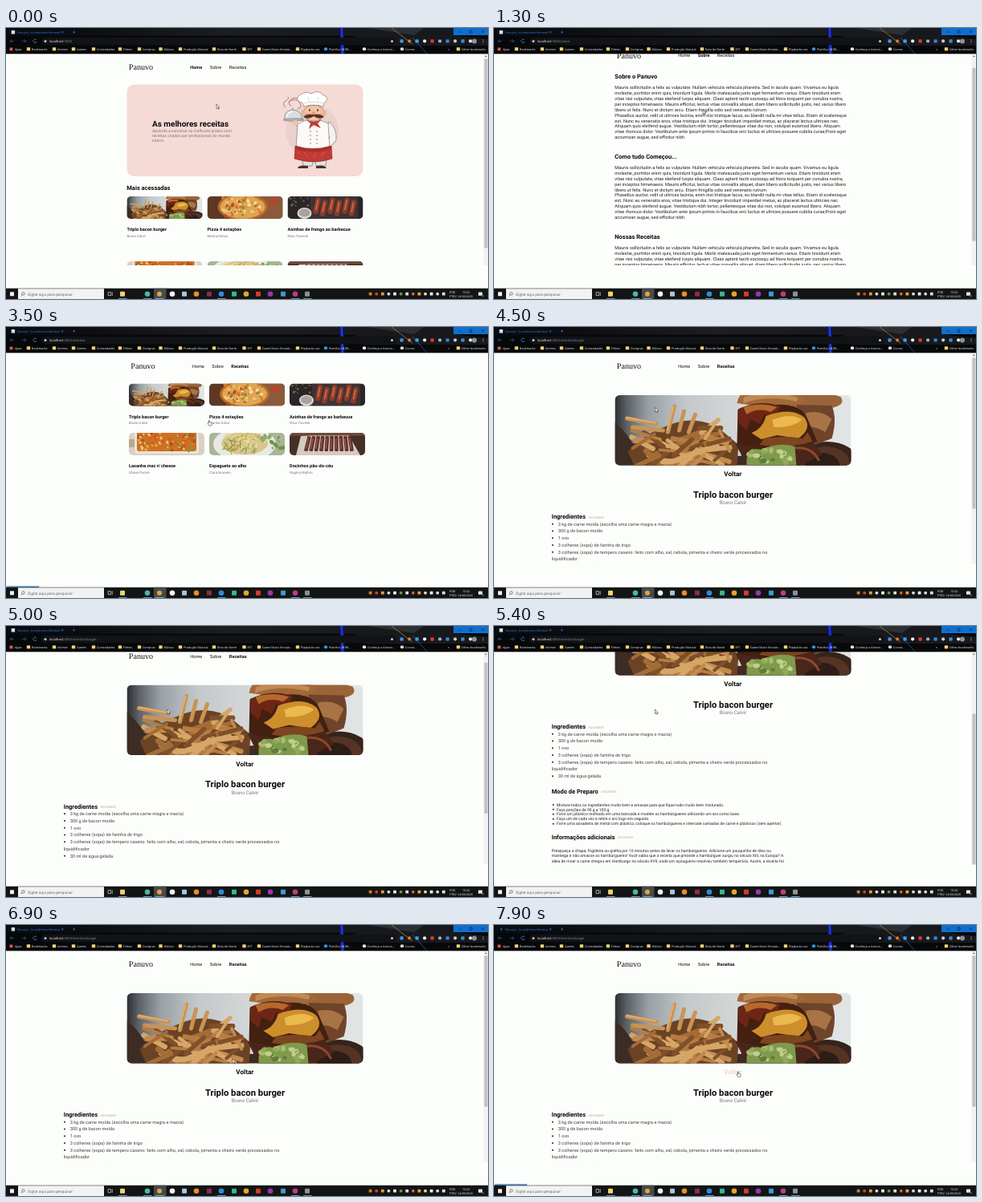
An HTML page that plays this animation: 600 px wide and 338 px high, repeating every 8 s.

```html
<!DOCTYPE html>
<html lang="pt-BR">
<head>
<meta charset="utf-8">
<title>Receitas</title>
<style>
html, body { margin: 0; width: 100%; height: 100%; overflow: hidden; background: #fcfefb; }
svg { display: block; width: 600px; height: 338px; font-family: Roboto, "Liberation Sans", sans-serif; }
text { text-rendering: geometricPrecision; white-space: pre; }
.ui { font-family: "Open Sans", "Noto Sans", sans-serif; }
.logo { font-family: "Liberation Serif", serif; }
</style>
</head>
<body>
<svg id="stage" viewBox="0 0 600 338" xmlns="http://www.w3.org/2000/svg"></svg>
<script>
const LOOP = 8000, STEP = 100;
const BRAND = 'Panuvo';
const CARDS = [
  ['Triplo bacon burger', 'Bruno Calvir'], ['Pizza 4 estações', 'Marina Dolvo'],
  ['Asinhas de frango ao barbecue', 'Elisa Trovenk'], ["Lasanha mac n' cheese", 'Otávio Parzel'],
  ['Espaguete ao alho', 'Clara Numeto'], ['Docinhos pão-do-céu', 'Rogério Baltim']
];

// Markup helpers
const text = (x, y, size, str, fill = '#111', extra = '') =>
  `<text x="${x}" y="${y}" font-size="${size}" fill="${fill}" ${extra}>${str}</text>`;
const BOLD = 'font-weight="700"', MID = 'text-anchor="middle"';
const bold = (x, y, size, str, extra = '') => text(x, y, size, str, '#0b0b0b', BOLD + ' ' + extra);
const ui = (x, y, size, str, fill = '#f4f5f6', extra = '') => text(x, y, size, str, fill, 'class="ui" ' + extra);
const rect = (x, y, w, h, fill, r = 0, extra = '') =>
  `<rect x="${x}" y="${y}" width="${w}" height="${h}" rx="${r}" fill="${fill}" ${extra}/>`;
const oval = (x, y, rx, ry, fill, extra = '') =>
  `<ellipse cx="${x}" cy="${y}" rx="${rx}" ry="${ry}" fill="${fill}" ${extra}/>`;
const path = (d, fill = 'none', stroke = 'none', w = 1, extra = '') =>
  `<path d="${d}" fill="${fill}" stroke="${stroke}" stroke-width="${w}" ${extra}/>`;
const group = (x, y, body, extra = '') => `<g transform="translate(${x} ${y})" ${extra}>${body}</g>`;
const lines = (x, y, gap, size, list, fill) => list.map((s, i) => text(x, y + i * gap, size, s, fill)).join('');
const repeat = (n, f) => Array.from({ length: n }, (_, i) => f(i)).join('');

function random(seed) {
  return () => (seed = seed * 16807 % 2147483647) / 2147483647;
}

// Scattered ovals or sticks for food textures
function scatter(seed, n, [x, y, w, h], colors, size, stick = 0, tilt = 180) {
  const r = random(seed);
  return repeat(n, () => {
    const cx = x + r() * w, cy = y + r() * h, k = size * (.6 + r() * .7);
    const fill = colors[Math.floor(r() * colors.length)], a = (r() - .5) * tilt;
    return `<g transform="translate(${cx.toFixed(1)} ${cy.toFixed(1)}) rotate(${a.toFixed(0)})">` +
      (stick ? rect(-stick / 2, -k / 2, stick, k, fill, k / 2.4) : oval(0, 0, k, k * .7, fill)) + '</g>';
  });
}

// 294 x 88 picture, also used small on its card
const FRIES = ['#c48a4e', '#a36c37', '#d6a668', '#7f5029', '#b67c42'];
const burger = rect(0, 0, 294, 88, 'url(#room)') +
  path('M0 34Q14 46 22 60L150 76L294 70V88H0Z', '#3c2c23') +
  path('M16 70Q36 48 66 38Q96 24 128 40L154 62L152 88H24Z', '#6b4324') +
  scatter(71, 34, [34, 46, 96, 40], FRIES, 6, 36, 90) +
  scatter(23, 8, [118, 38, 20, 36], FRIES, 6, 32, 150) +
  path('M15 29L52 36M22 40L60 44M66 46L74 14M80 44L86 20M92 46L100 24', 'none', '#c99355', 5, 'stroke-linecap="round"') +
  path('M15 28L50 34.5M65 44L73 14', 'none', '#e0b77c', 1.6, 'stroke-linecap="round"') +
  oval(264, 82, 38, 24, '#35241c') + oval(262, 84, 30, 20, '#553425') + oval(258, 88, 22, 16, '#2c1d17') +
  path('M214 0Q250 -8 281 2Q288 12 270 16L222 17Z', '#9a6439') +
  path('M226 12L270 13Q277 30 270 54L244 64Z', '#70442a') + path('M238 22Q258 18 270 30L262 46Q248 38 236 40Z', '#a87445') +
  path('M152 10Q156 -14 196 -12Q230 -12 236 8Q214 18 186 15Z', '#a2683a') +
  path('M160 3Q190 -8 228 3L226 8Q190 -1 160 10Z', '#c08a55') +
  path('M153 18Q176 6 200 12Q232 10 240 30L252 58Q206 74 152 62Z', '#43200f') +
  path('M154 17Q180 6 206 14L200 28L186 24L180 36L168 30L164 44L154 34Z', '#6d2615') +
  path('M160 15Q182 8 202 15L194 21Q178 15 164 24Z', '#b5692c') +
  path('M188 26Q220 14 236 28Q246 42 228 54L202 50L182 55L170 47Q184 42 188 26Z', '#cd8e2c') +
  path('M196 31Q220 21 233 31Q220 41 198 40Z', '#ecb94e') +
  path('M186 54Q212 50 234 54L240 46L246 58Q214 68 180 62Z', '#7d4520') +
  path('M150 60Q196 72 246 58L258 74L230 88H164Z', '#4a2519') +
  path('M164 80Q166 64 182 68Q204 58 224 64L226 88H164Z', '#7f9a4c') +
  scatter(33, 24, [168, 68, 54, 18], ['#a9bd70', '#5f7d36', '#90aa58', '#c2cf91'], 3.6) +
  path('M224 66Q246 64 254 82', 'none', '#8a4a2c', 3);

const photos = [
  `<g transform="scale(.32)">${burger}</g>`,
  rect(0, 0, 94, 28, '#5e3825') + rect(62, 0, 32, 28, '#8b5a3c') + oval(44, 13, 31, 17, '#b86a2b') +
    oval(44, 13, 28, 14.5, '#e0a54f') +
    scatter(5, 55, [20, 2, 48, 23], ['#c4432a', '#efc777', '#7d8a3c', '#d9782f', '#f1dca8'], 2.2) +
    oval(82, 7, 6, 4, '#b4452c'),
  rect(0, 0, 94, 28, '#2b2527') + rect(28, 0, 60, 28, '#3c3334') +
    repeat(6, i => `<g transform="rotate(12 ${36 + i * 9} 13)">${rect(33 + i * 9, 1 + i % 2 * 3, 6.5, 21, '#8e3a28', 3)}${rect(35 + i * 9, 4 + i % 2 * 3, 2, 13, '#c7694a', 1)}</g>`) +
    oval(21, 21, 9, 7, '#d9d5d0') + oval(21, 20.5, 7, 5, '#a9a3a0') + scatter(8, 14, [2, 1, 24, 12], ['#56733a', '#704038'], 1.5),
  rect(0, 0, 94, 28, '#d8d1c4') + rect(7, -2, 80, 28, '#e9e4da', 4) + rect(10, -2, 74, 25, '#cf6f22', 3) +
    scatter(17, 95, [12, 0, 70, 22], ['#e9a13b', '#d4581f', '#f3c567', '#b8441d', '#88923a'], 2) + rect(0, 8, 7, 10, '#b7a88f'),
  rect(0, 0, 94, 28, '#a8b596') + oval(44, 14, 39, 21, '#e8e9e2') + oval(44, 13, 29, 14, '#d6c68c') +
    scatter(29, 70, [20, 2, 48, 22], ['#e5cf83', '#b99a47', '#f0e2ad', '#7d9a49'], 1.2, 8) +
    scatter(41, 12, [66, 0, 28, 20], ['#6f9150', '#8dab6e'], 3),
  rect(0, 0, 94, 28, '#463026') + path('M14 4L72 0L88 28H8Z', '#d5cac0') +
    repeat(10, i => `<g transform="rotate(${14 - i * 2.5} ${22 + i * 6} 14)">${rect(20 + i * 6, 4, 4.6, 19, '#5f3128', 1)}${rect(21 + i * 6, 7, 1.4, 13, '#94594a')}</g>`) +
    rect(0, 0, 94, 3.5, '#6e4c39')
];

const chef = oval(381, 128, 33, 33, 'url(#dots)') +
  path('M348 99q-5 -5 0 -8t3 -5M355 98q-6 -6 1 -8t10 4t-3 6M352 93q4 -8 12 -5t6 -1', 'none', '#7b5d55', .7) +
  path('M361 121Q354 118 354 110L361 109L371 117L369 130Z', '#f5f3f0', '#5c4f4b', .5) +
  path('M402 117Q412 124 411 140L401 151L397 144L403 137L398 127Z', '#f4f2ef', '#5c4f4b', .5) +
  path('M368 154H400L398 172H386L384 160L381 172H370Z', '#e6e2df', '#5c4f4b', .5) +
  path('M363 175q1 -5 13 -3v3zM386 175v-3q11 -2 13 3z', '#4a302c') +
  path('M363 120Q381 108 401 119L403 151Q381 158 361 151Z', '#fbfaf8', '#5c4f4b', .5) +
  path('M360 147Q382 154 405 147L406 163Q383 171 359 163Z', '#c03b35', '#6b2723', .5) +
  path('M360 147Q382 154 405 147V151Q382 158 360 151Z', '#a92f2c') +
  path('M363 154l4 4m4 -3l5 5m10 -4l-4 5m15 -7l-5 6', 'none', '#de7169', .7) +
  path('M373 114Q383 119 393 114L388 119L392 125L383 121L377 126L379 119Z', '#c23c36') +
  oval(383, 106, 13, 10, '#f4c3a1', 'stroke="#5c4f4b" stroke-width=".5"') +
  oval(369.5, 106, 2.2, 3, '#eeb18d') + oval(396.5, 106, 2.2, 3, '#eeb18d') +
  oval(378, 102.5, .9, 1.2, '#352522') + oval(388, 102.5, .9, 1.2, '#352522') +
  oval(383, 106, 2.3, 2, '#e69c7e') + oval(374, 108, 2.2, 1.7, '#eba38a') + oval(392, 108, 2.2, 1.7, '#eba38a') +
  path('M383 108Q375 106 370 111Q376 115 383 110Q390 115 396 111Q391 106 383 108Z', '#5a3327') +
  path('M371 98Q369 91 367 93Q358 88 367 83Q373 78 380 82Q389 76 395 84Q404 86 396 94L395 98Q383 94 371 98Z', '#fff', '#5c4f4b', .5) +
  path('M371 94Q383 90 396 94M377 91l-1 -5M388 90l1 -4', 'none', '#b5aaa6', .5) +
  path('M347 114Q345 104 356 102Q367 102 369 113Z', '#d9dfe0', '#5c4f4b', .5) +
  path('M350 111Q350 106 356 104', 'none', '#fff', 1.4) + oval(357, 101, 1.4, 1.2, '#a7adb0') +
  oval(358, 114.5, 13, 1.7, '#aeb6b8', 'stroke="#5c4f4b" stroke-width=".4"') + oval(360, 118, 4, 2.8, '#f4c3a1') +
  repeat(4, i => oval(379, 129 + i * 5, .8, .8, '#86716c') + oval(387, 129 + i * 5, .8, .8, '#86716c'));

function nav(active) {
  return text(152.8, 52.4, 10.1, BRAND, '#111', 'class="logo"') +
    [['Home', 229.2], ['Sobre', 253.8], ['Receitas', 277.8]].map(([s, x], i) =>
      text(x, 51.2, 5.625, s, '#111', i === active ? BOLD : '')).join('');
}

function card(i, y) {
  const [name, author] = CARDS[i], x = 150.5 + i % 3 * 100;
  return group(x, y, `<g clip-path="url(#cardClip)">${photos[i]}</g>` +
    bold(0, 43, 5.625, name) + text(0, 50.9, 4.375, author, '#777'));
}
const row = (first, y) => repeat(3, i => card(first + i, y));

const home = nav(0) + rect(150.5, 70.5, 294, 114.5, '#f6dad5', 9) + chef +
  bold(182, 122.6, 10, 'As melhores receitas') +
  lines(182, 129.8, 5.9, 5, ['Aprenda a construir os melhores pratos com', 'receitas criadas por profissionais do mundo', 'inteiro.'], '#777') +
  bold(150.3, 201.9, 7.5, 'Mais acessadas') + row(0, 210) + row(3, 291);

const lorem = [
  'Mauris sollicitudin a felis ac vulputate. Nullam vehicula vehicula pharetra. Sed in iaculis quam. Vivamus eu ligula',
  'molestie, porttitor enim quis, tincidunt ligula. Morbi malesuada justo eget fermentum varius. Etiam tincidunt enim',
  'vitae nisi vulputate, vitae eleifend turpis aliquam. Class aptent taciti sociosqu ad litora torquent per conubia nostra,',
  'per inceptos himenaeos. Mauris efficitur, lectus vitae convallis aliquet, diam libero sollicitudin justo, nec varius libero',
  'libero ut felis. Nunc et dictum arcu. Etiam fringilla odio sed venenatis rutrum.',
  'Phasellus auctor, velit ut ultrices lacinia, enim nisi tristique lacus, eu blandit nulla mi vitae tellus. Etiam id scelerisque',
  'est. Nunc eu venenatis eros, vitae tristique dui. Integer tincidunt imperdiet metus, ac placerat lectus ultricies nec.',
  'Aliquam quis eleifend augue. Vestibulum nibh tortor, pellentesque vitae dui non, volutpat euismod libero. Aliquam',
  'vitae rhoncus dolor. Vestibulum ante ipsum primis in faucibus orci luctus et ultrices posuere cubilia curae;Proin eget',
  'accumsan augue, sed efficitur nibh.'
];
const about = nav(1) + ['Sobre o ' + BRAND, 'Como tudo Começou...', 'Nossas Receitas'].map((s, i) =>
  group(150.3, 77.6 + i * 99.8, bold(0, 0, 7.5, s) + lines(0, 13.4, 6.88, 5.625, lorem, '#222'))).join('');

const recipes = group(2.5, 0, nav(2) + row(0, 70.5) + row(3, 132));

const section = (y, s, x) => bold(71.7, y, 7.5, s) + text(x, y - .9, 3.75, 'ESCONDER', '#aaa');
const bullet = (x, y, gap, n) => repeat(n, i => oval(x, y + i * gap, 1, 1, '#222'));
const recipe = nav(2) + group(150.5, 85, `<g clip-path="url(#heroClip)">${burger}</g>`) +
  bold(297.3, 186.2, 8.1, 'Voltar', MID + ' id="back"') +
  bold(297.5, 212.5, 11.25, CARDS[0][0], MID) + text(297.5, 221.2, 6.25, CARDS[0][1], '#777', MID) +
  section(239.4, 'Ingredientes', 117.7) + bullet(73, 245.7, 8.75, 5) + bullet(73, 298.2, 1, 1) +
  lines(79.7, 247.6, 8.75, 5.625, ['3 kg de carne moída (escolha uma carne magra e macia)', '300 g de bacon moído', '1 ovo', '3 colheres (sopa) de farinha de trigo',
    '3 colheres (sopa) de tempero caseiro: feito com alho, sal, cebola, pimenta e cheiro verde processados no'], '#444') +
  text(71.7, 291.3, 5.625, 'liquidificador', '#444') + text(79.7, 300.1, 5.625, '30 ml de água gelada', '#444') +
  group(0, .8, section(318.8, 'Modo de Preparo', 133.5) + bullet(73.8, 333.1, 5.95, 5) +
  lines(78, 334.8, 5.95, 5, ['Misture todos os ingredientes muito bem e amasse para que fique tudo muito bem misturado.', 'Faça porções de 90 g a 100 g.',
    'Forre um plástico molhado em uma bancada e modele os hambúrgueres utilizando um aro como base.', 'Faça um de cada vez e retire o aro logo em seguida.',
    'Forre uma assadeira de metal com plástico, coloque os hambúrgueres e intercale camadas de carne e plásticos (sem apertar).'], '#222') +
  section(376.6, 'Informações adicionais', 154) +
  lines(71.7, 392.3, 6.3, 5, ['Preaqueça a chapa, frigideira ou grelha por 10 minutos antes de levar os hambúrgueres. Adicione um pouquinho de óleo ou',
    'manteiga e não amasse os hambúrgueres! Você sabia que a receita que precede o hambúrguer surgiu no século XIII, na Europa? A',
    'ideia de moer a carne chegou em Hamburgo no século XVII, onde um açougueiro resolveu também temperá-la. Assim, a receita foi',
    'disseminada nos Estados Unidos por alemães da região.'], '#222'));

// Browser frame and desktop bar
const marks = [['Bookmarks', 32], ['Animes', 64], ['Games', 88], ['Curiosidades', 113], ['Filmes', 146], ['Compras', 170], ['Música', 196.5],
  ['Produção Musical', 221], ['Rota do Norte', 263], ['EFT', 300.5], ['Game Music Emulat...', 319], ['Playbacks sax', 367],
  ['Planilha 2B R8...', 402, '#2e9be6'], ['Conheça o Acervo...', 450, '#e8e8e8'], ['Cursos', 497, '#d8d8d8'], ['Other bookmarks', 567]];
const extensions = ['#4a90e2', '#d8792c', '#3aa0e8', '#f0f0f0', '#d93b32', '#9fb6c4', '#3d7de0', '#c8cdd2', '#3a8fd0', '#e5e5e5'];
const browser = rect(0, 0, 600, 32.3, '#07080a') + rect(90, 0, 467, 9.5, 'url(#strip)') +
  path('M424 0H557V9L600 14V22H446Z', '#17191c') + path('M450 0H520L508 9Z', '#2c2f33') +
  path('M480 0L506 20', 'none', '#c98c35', .7) + path('M506 12L524 32', 'none', '#2b5fd0', .8) +
  path('M414.8 0H420.6L421.8 32H416Z', '#0c1568') + path('M416.6 0H419L420.2 32H417.8Z', '#2637dd') +
  rect(2, .5, 88, 9, '#0b0d12') + ui(14, 6.7, 3.7, BRAND + ' | As melhores Receitas', '#2d84e8') +
  path('M69 4l2.4 2.4m0 -2.4l-2.4 2.4M83 5.2h3m-1.5 -1.5v3', 'none', '#3a8ee8', .6) +
  rect(557, 0, 43, 9, '#0f6fcf') + path('M564 5h3M592 3l3 3m0 -3l-3 3M577 3.2h3v3h-3z', 'none', '#0a1830', .6) +
  rect(44, 11.8, 442, 9.5, '#111317', 4.7) +
  path('M10 16.3H5m2 -2l-2 2l2 2M20 16.3h5m-2 -2l2 2l-2 2', 'none', '#2b6cb0', .7) +
  path('M38 15a2.2 2.2 0 1 0 .3 2', 'none', '#4a9be8', .7) + oval(49, 16.5, 1.6, 1.6, '#bfc4c9') +
  ui(54, 18, 4.15, 'localhost', '#fff', 'id="host"') + oval(480.5, 16.5, 1.5, 1.5, '#c8cdd2') +
  extensions.map((c, i) => rect(490.5 + i * 9.5, 14.2, 4.2, 4.2, c, i % 2 ? 2.1 : .7)).join('') +
  oval(583, 16.4, 3, 3, '#8d9298') + repeat(3, i => oval(594, 14.7 + i * 1.7, .5, .5, '#ddd')) +
  rect(4.5, 24.4, 3.9, 3.9, '#d85b4a', .4) + ui(11, 27.7, 3.7, 'Apps') +
  marks.map(([s, x, c]) => rect(x - 6.2, 24.3, 4.4, 4, c || '#f3d36a', c ? 2 : .5) + ui(x, 27.7, 3.7, s)).join('') +
  ui(550, 27.7, 4, '»');

const apps = ['#f2d16b', '#4fb6a4', '#e8a33d', '#f4f4f4', '#a9c4dd', '#f08b24', '#8c2b55', '#2a8de0', '#35b98a', '#e3a62b', '#d63a2a', '#9b35b0', '#3c9bd6', '#c23a80', '#8d9296'];
const slots = [145, 176, 191, 207, 222, 237, 253, 268, 284, 299, 314, 329, 345, 360, 375];
const tray = ['#d8792c', '#c44', '#e0a030', '#ddd', '#eee', '#5a9f4c', '#ddd', '#d06c2a', '#f0a030', '#ddd', '#eee', '#ddd', '#ddd'];
const taskbar = rect(0, 324.7, 600, 13.3, '#131514') + rect(5, 329.3, 5, 5, '#f0f0f0') + rect(15, 325.2, 107, 12.8, '#f1f2f2') +
  `<circle cx="21.5" cy="331.4" r="1.7" fill="none" stroke="#333" stroke-width=".6"/>` + path('M20.3 332.7l-1.6 1.7', 'none', '#333', .6) +
  ui(27, 333.7, 4.6, 'Digite aqui para pesquisar', '#555') +
  path('M127 329.6h3.6v4h-3.6zM132.3 329.3v4.6', 'none', '#ddd', .7) + rect(184, 324.7, 15.5, 13.3, '#454a4d') +
  slots.map((x, i) => i % 2 ? oval(x, 331.8, 3.3, 3.3, apps[i]) : rect(x - 3, 328.8, 6, 6, apps[i], i === 2 ? 3 : .8)).join('') +
  [140, 171, 186, 263, 355, 370].map(x => rect(x, 337.2, 10.5, .8, '#76b9ed')).join('') +
  tray.map((c, i) => rect(451.7 + i * 7.6, 329.8, 3.8, 3.8, c, i % 2 ? 1.9 : .6)).join('') +
  ui(552, 330.6, 3.7, 'POR') + ui(552, 336.4, 3.7, 'PTB2') + ui(568, 330.6, 3.7, '15:02') + ui(562.5, 336.4, 3.5, '24/06/2020') +
  rect(588, 329.4, 5, 4.3, '#e8e8e8', .5) + oval(593.5, 333.9, 1.5, 1.5, '#555');

const stage = document.getElementById('stage');
stage.innerHTML = `<defs>
  <linearGradient id="room"><stop stop-color="#2f2f32"/><stop offset=".05" stop-color="#5b6166"/><stop offset=".14" stop-color="#98a0a5"/><stop offset=".3" stop-color="#c3c8ca"/><stop offset=".5" stop-color="#d3d6d6"/><stop offset="1" stop-color="#e2e5e5"/></linearGradient>
  <linearGradient id="strip"><stop stop-color="#0c0d0f"/><stop offset=".4" stop-color="#1c1e21"/><stop offset="1" stop-color="#141619"/></linearGradient>
  <pattern id="dots" width="1.8" height="1.8" patternUnits="userSpaceOnUse"><circle cx=".9" cy=".9" r=".45" fill="#b9a9a6"/></pattern>
  <clipPath id="cardClip"><rect width="94" height="28" rx="5"/></clipPath>
  <clipPath id="heroClip"><rect width="294" height="87.5" rx="6"/></clipPath>
  <clipPath id="view"><rect y="32" width="600" height="264"/></clipPath></defs>` +
  rect(0, 0, 600, 338, '#fcfefb') +
  `<g clip-path="url(#view)">${[home, about, recipes, recipe].map(p => `<g class="page">${p}</g>`).join('')}</g>` +
  `<g id="bar">${rect(594.7, 32, 5.3, 264, '#f1f2f1')}${path('M596 36l1.4 -1.7l1.4 1.7z', '#666')}${rect(595.3, 0, 4.2, 10, '#c1c2c1', 0, 'id="thumb"')}</g>` +
  browser + oval(9, 5.2, 1, 1, '#3a8ee8', 'id="busy"') + rect(6.7, 3, 4.4, 4.4, '#d9dde0', .5, 'id="icon"') +
  ui(0, 18, 4.15, '', '#8b9096', 'id="path"') +
  `<g id="status">${rect(0, 322.3, 42, 3, '#dfe7ee')}${rect(1, 323.4, 40, 1.6, '#3f7fb8')}</g>` + taskbar +
  path('M0 0V5.6L1.3 4.4L2.2 6.3L3 5.9L2.2 4.1H3.9Z', '#fff', '#111', .5, 'id="arrow"') +
  path('M1.3 .5Q2 0 2.3 .8V2.6L4.7 3.2Q5.4 3.5 5.2 4.4L4.7 7H1.9L.1 4.4Q0 3.5 .9 3.7L1.3 4.1Z', '#fff', '#111', .5, 'id="hand"');

const $ = id => document.getElementById(id);
const pages = [...document.querySelectorAll('.page')];
$('path').setAttribute('x', 54 + $('host').getComputedTextLength());

// Timeline: [time, ...values]
const visits = [[0, 0], [900, 1], [2900, 2], [4300, 3]];
const urls = [':5000', ':5000/sobre', ':5000/receitas', ':5000/receitas/burger'];
const thumbs = [[236, .84], [216, .76], null, [188, .64]];
const scrolls = [[0, 0], [1100, 0], [1200, 5], [1300, 14.7], [1500, 52], [1600, 64], [1700, 46], [1900, 0], [4900, 0], [5000, 11.5], [5200, 72],
  [5400, 111], [5600, 122], [5900, 108], [6100, 60], [6200, 35.5], [6300, 11], [6400, 0]];
const pointer = [[0, 262, 95], [500, 261, 49], [900, 261, 50], [1300, 260, 102], [1900, 268, 92], [2400, 287, 49], [2900, 287, 50],
  [3500, 251, 116], [3900, 204, 90], [4300, 201, 97], [4700, 200.5, 104], [6400, 200.5, 104], [7100, 302, 182.5]];
const hovers = [[400, 900], [2300, 2900], [3300, 4300], [7000, 8000]];
const waits = [[700, 900], [2700, 2900], [4100, 4400], [7500, 8000]];

const during = (spans, t) => spans.some(([a, b]) => t >= a && t < b);
function at(track, t, ease = u => u) {
  const i = track.findIndex(k => k[0] > t);
  if (i < 0) return track[track.length - 1].slice(1);
  const a = track[i - 1], b = track[i], u = ease((t - a[0]) / (b[0] - a[0]));
  return a.slice(1).map((v, j) => v + (b[j + 1] - v) * u);
}
const smooth = u => u * u * (3 - 2 * u);
const show = (el, on) => el.setAttribute('visibility', on ? 'visible' : 'hidden');

function draw(t) {
  const page = visits.filter(v => v[0] <= t).pop()[1];
  const [scroll] = at(scrolls, t), [x, y] = at(pointer, t, smooth);
  const over = during(hovers, t), busy = during(waits, t), bar = thumbs[page];
  pages.forEach((p, i) => {
    p.style.display = i === page ? '' : 'none';
    p.setAttribute('transform', `translate(0 ${-scroll})`);
  });
  show($('bar'), bar);
  show($('thumb'), bar);
  if (bar) {
    $('thumb').setAttribute('height', bar[0]);
    $('thumb').setAttribute('y', 38.5 + scroll * bar[1]);
  }
  $('path').textContent = urls[page];
  show($('busy'), busy);
  show($('icon'), !busy);
  show($('status'), over);
  $('back').setAttribute('fill', t >= 7000 ? '#f0d5c6' : '#0b0b0b');
  for (const id of ['arrow', 'hand']) {
    $(id).setAttribute('transform', `translate(${x} ${y})`);
    show($(id), over === (id === 'hand'));
  }
}

const start = performance.now();
function tick(now) {
  const t = Math.max(0, now - start) % LOOP;
  draw(Math.floor(t / STEP) * STEP);
  requestAnimationFrame(tick);
}
draw(0);
requestAnimationFrame(tick);
</script>
</body>
</html>
```
